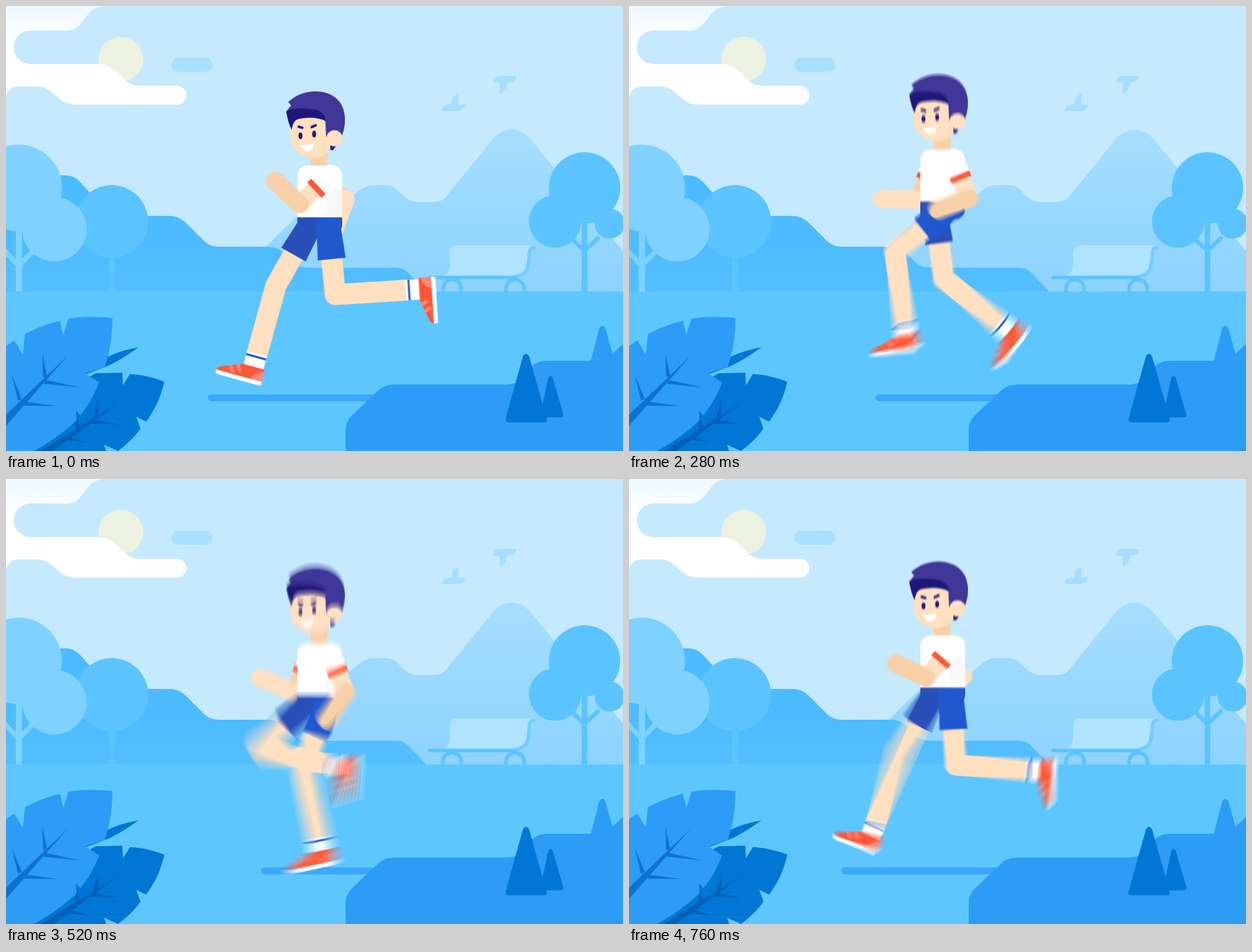
An HTML page with a canvas for the animation above (800 ms loop, 881x636 px).

```html
<!DOCTYPE html>
<html lang="en">
<head>
<meta charset="utf-8">
<title>Runner in the park</title>
<style>
html, body { margin: 0; width: 100%; height: 100%; overflow: hidden; background: #c5e9ff; }
canvas { display: block; }
</style>
</head>
<body>
<canvas id="stage" width="881" height="636"></canvas>
<script>
const W = 881, H = 636, LOOP = 800, STEP = 40, SHUTTER = 24, SAMPLES = 8;
const SKIN = '#ffdabe', TAN = '#f8cba8', NAVY = '#1c1678', RED = '#fa5233';
const LEAF = '#2c9cf6', DEEP = '#0077d4', MID = '#5ec6ff';

function layer() {
  const c = document.createElement('canvas');
  c.width = W;
  c.height = H;
  return c.getContext('2d');
}
const stage = document.getElementById('stage').getContext('2d');
const back = layer(), front = layer(), pose = layer(), blur = layer();

function fill(g, color, d) {
  g.fillStyle = color;
  g.fill(new Path2D(d));
}
function line(g, color, width, d) {
  g.strokeStyle = color;
  g.lineWidth = width;
  g.lineCap = g.lineJoin = 'round';
  g.stroke(new Path2D(d));
}
function disc(g, color, x, y, rx, ry = rx) {
  g.fillStyle = color;
  g.beginPath();
  g.ellipse(x, y, rx, ry, 0, 0, 7);
  g.fill();
}
function box(g, color, x, y, w, h, r = 0) {
  g.fillStyle = color;
  g.beginPath();
  g.roundRect(x, y, w, h, r);
  g.fill();
}
function fade(g, y0, c0, y1, c1) {
  const f = g.createLinearGradient(0, y0, 0, y1);
  f.addColorStop(0, c0);
  f.addColorStop(1, c1);
  return f;
}
// Tapered vein from a wide root to a pointed tip
function spike(g, color, x0, y0, x1, y1, w) {
  const k = w / 2 / Math.hypot(x1 - x0, y1 - y0), nx = (y0 - y1) * k, ny = (x1 - x0) * k;
  fill(g, color, `M${x0 + nx},${y0 + ny}L${x1},${y1}L${x0 - nx},${y0 - ny}Z`);
}

function drawBack(g) {
  box(g, '#c5e9ff', 0, 0, W, H);
  disc(g, '#edf1e2', 164, 76, 32);
  fill(g, fade(g, 0, '#ecf8ff', 50, '#ffffff'),
    'M0,0H142C118,2 118,14 105,27C99,33 94,35 86,35H35A24,24 0 0 0 35,83H132C150,83 158,95 168,104' +
    'C176,112 182,114 195,114H244A13.5,13.5 0 0 1 244,141H100C84,141 78,134 70,127C60,118 54,115 42,115H20C8,115 0,120 0,135Z');
  box(g, '#a9e0ff', 236, 74, 59, 20, 10);
  fill(g, '#a6deff', 'M622,150C622,143 628,141 636,140C636,132 640,127 646,126V141H656C655,147 650,150 643,150Z');
  fill(g, '#a6deff', 'M695,109C696,103 700,100 707,100H729C728,106 724,109 715,110C715,118 711,124 705,125V110Z');

  fill(g, fade(g, 176, '#a5deff', 408, '#8dd3ff'),
    'M305,408L416,300L480,280C496,276 505,256 525,256H543C562,256 565,280 588,280H612C622,280 627,275 632,268' +
    'L692,194C709,171 735,171 752,194L881,350V408Z');
  fill(g, fade(g, 330, '#4dbbff', 408, '#54bfff'),
    'M0,242H84C96,242 102,247 108,254L128,276C140,290 150,300 165,300H232C246,300 252,305 259,312L281,334' +
    'C288,341 294,344 305,344H370C384,344 389,346 396,353L406,363C413,371 420,374 432,374H554C566,374 571,377 577,384L600,408H0Z');

  const pale = '#7fd2ff', leafy = '#5bc4ff';
  disc(g, leafy, 151, 308, 52);
  box(g, leafy, 147, 355, 9, 53);
  disc(g, pale, 18, 260, 62);
  disc(g, pale, 69, 319, 46);
  box(g, pale, 14, 315, 9, 93);
  line(g, pale, 7, 'M-2,350L18,371L42,347');

  disc(g, leafy, 826, 260, 51);
  disc(g, leafy, 784, 308, 37.5);
  disc(g, leafy, 862, 311, 21.5);
  box(g, leafy, 822, 305, 8, 103);
  line(g, leafy, 6, 'M806,331L826,350L845,332');

  fill(g, '#afe3ff', 'M645,342H752C746,348 749,360 745,372C742,381 736,386 726,386H620C630,384 634,380 634,368V353C634,346 638,342 645,342Z');
  line(g, '#74ccff', 5, 'M727,387C746,384 746,372 747,358C747,348 749,345 754,345');
  line(g, leafy, 5, 'M605,388H727');
  for (const x of [637, 727]) line(g, leafy, 5, `M${x - 13},410V404A13,13 0 0 1 ${x + 13},404V410`);
  box(g, MID, 0, 408, W, 228);
}

function drawFront(g) {
  fill(g, LEAF,
    'M485,636V606C485,596 489,590 496,583L530,551C538,543 546,541 558,541H712C728,541 735,536 742,526' +
    'C752,511 760,507 775,507H835L847,461Q851.500,453 856,461L866,497L881,483V636Z');
  fill(g, DEEP, 'M713,591L738,501Q742.500,493 747,501L772,590Q773,595 768,595H717Q713,595 713,591Z');
  fill(g, DEEP, 'M762,588L774.500,531Q777.500,526 780.500,531L796,584Q796,588 792,588Z');

  fill(g, DEEP, 'M112,527C128,506 158,493 189,488C170,501 156,511 136,518Z');
  fill(g, DEEP,
    'M40,636L100,540L128,525L166,524L167,542L177,526C194,527 212,531 226,537C221,560 212,578 200,594' +
    'L186,587L192,604C183,617 172,627 160,636L140,627L143,636Z');
  const dark = '#0060b8';
  spike(g, dark, 50, 642, 166, 564, 11);
  spike(g, dark, 102, 602, 99, 574, 6);
  spike(g, dark, 128, 588, 133, 559, 6);
  spike(g, dark, 120, 594, 162, 598, 6);
  spike(g, dark, 84, 617, 120, 624, 6);

  fill(g, LEAF,
    'M0,486L12,478L24,498L27,469C44,460 60,454 77,450L82,470L89,447C110,443 132,444 152,446' +
    'C152,472 148,496 141,516L113,525L133,538C126,556 117,572 106,585L100,578L101,592C84,608 65,622 40,636H0Z');
  const vein = '#0f72d0';
  spike(g, vein, -8, 600, 88, 500, 12);
  spike(g, vein, 56, 530, 52, 497, 6);
  spike(g, vein, 20, 563, 8, 527, 6);
  spike(g, vein, 55, 537, 104, 545, 6);
  spike(g, vein, 24, 568, 75, 572, 6);
}

// Every key pose comes to rest at multiples of 200 ms
function settle(t) {
  const k = Math.floor(t / 200), f = t / 200 - k;
  return 200 * (k + f * f * (3 - 2 * f));
}

// Cyclic cubic through rows of [time, values...]
function track(rows, period, warp = t => t) {
  const n = rows.length;
  const time = i => warp(rows[(i + n) % n][0]) + period * Math.floor(i / n);
  const row = i => rows[(i + n) % n];
  return ms => {
    const t = warp(((ms % period) + period) % period);
    let i = n - 1;
    while (i > 0 && time(i) > t) i--;
    const span = time(i + 1) - time(i), u = (t - time(i)) / span;
    return row(i).slice(1).map((a, j) => {
      const at = k => row(k)[j + 1];
      const slope = k => (at(k + 1) - at(k - 1)) / (time(k + 1) - time(k - 1)) * span;
      const b = at(i + 1), m0 = slope(i), m1 = slope(i + 1), d = b - a;
      return a + u * (m0 + u * (3 * d - 2 * m0 - m1 + u * (m0 + m1 - 2 * d)));
    });
  };
}

const bodyY = track([[0, 228], [80, 240], [120, 236], [200, 201], [360, 224]], 400, settle);
const shadow = track([[0, 162], [120, 86], [200, 74], [360, 147]], 400, settle);
const headLift = track([[0, 106], [120, 106], [200, 106], [240, 109], [360, 104], [520, 110], [600, 112], [760, 106]], LOOP);
const ankle = track([[0, 573, 406], [120, 470, 410], [200, 421, 428], [360, 360, 495],
  [400, 367, 501], [520, 446, 515], [600, 511, 483], [760, 569, 416]], LOOP, settle);
// Upper arm and forearm angles in degrees
const armSwing = track([[0, 137, 224], [120, 113, 204], [200, 89, 180], [360, 46, 137],
  [400, 33, 110], [520, 68, 125], [600, 90, 157], [760, 130, 205]], LOOP);

function local(g, x, y, angle, draw) {
  g.save();
  g.translate(x, y);
  g.rotate(angle - Math.PI / 2);
  draw();
  g.restore();
}

function foot(g) {
  box(g, '#ffffff', -14.5, -2, 29, 22);
  box(g, '#2358c4', -14.5, 1, 29, 3);
  fill(g, RED, 'M-15,17H16L17,36H-50C-50,31 -46,29 -40,27Z');
  fill(g, '#fb8675', 'M17,36H1A16,15 0 0 1 16.300,21Z');
  line(g, '#fb8675', 5, 'M-21,21L-18,27M-31,25L-28,30');
  fill(g, '#ffffff', 'M-50,35H17V38Q17,41 14,41H-47Q-51,41 -50,35Z');
}

function leg(g, hx, hy, t, dx, dy, color) {
  const L = 103, [px, py] = ankle(t), ax = px + dx, ay = py + dy;
  const vx = ax - hx, vy = ay - hy, d = Math.hypot(vx, vy);
  const bend = Math.sqrt(Math.max(0, L * L - d * d / 4)) / d;
  const kx = hx + vx / 2 - vy * bend, ky = hy + vy / 2 + vx * bend;
  g.lineCap = 'butt';
  g.lineJoin = 'round';
  g.lineWidth = 30;
  g.strokeStyle = SKIN;
  g.beginPath();
  g.moveTo(hx, hy);
  g.lineTo(kx, ky);
  g.lineTo(ax, ay);
  g.stroke();
  local(g, ax, ay, Math.atan2(ay - ky, ax - kx), () => foot(g));
  local(g, hx, hy, Math.atan2(ky - hy, kx - hx), () =>
    fill(g, color, 'M-17,0A17,17 0 0 1 17,0L20,52H-20Z'));
}

function arm(g, sx, sy, t, fore, upperColor, foreColor) {
  const [a, b] = armSwing(t).map(v => v * Math.PI / 180);
  const ex = sx + 60 * Math.cos(a), ey = sy + 60 * Math.sin(a);
  line(g, upperColor, 25, `M${sx},${sy}L${ex},${ey}`);
  line(g, foreColor, 26, `M${ex},${ey}l${fore * Math.cos(b)},${fore * Math.sin(b)}`);
  local(g, sx, sy, a, () => {
    fill(g, '#ffffff', 'M-15,0A15,15 0 0 1 15,0V24H-15Z');
    box(g, RED, -15, 23, 30, 8);
  });
}

function head(g) {
  box(g, SKIN, 406, 145, 64, 72, 31);
  fill(g, '#2a248a', 'M463,196L475,195L467,206H463Z');
  fill(g, '#3a3693',
    'M400,151L407,142L403,137C414,127 428,122 442,122C468,122 484,138 484,162C484,172 482,180 479,187L457,187L456,163L430,150Z');
  disc(g, SKIN, 469, 189, 11.5);
  fill(g, NAVY,
    'M400,151C408,145 420,146 434,147C448,148 456,153 457,165C446,158 426,159 416,162C410,165 409,171 408,177C404,170 402,161 400,151Z');
  disc(g, NAVY, 420.5, 185.5, 2.8, 4.8);
  disc(g, NAVY, 440, 183, 2.8, 4.8);
  line(g, NAVY, 3.6, 'M418,172.500L423,174M436.500,173L442,170.500');
  fill(g, '#ffffff', 'M420,199C426,199 434,198 439,196C440,210 423,211 420,199Z');
}

function drawRunner(g, t) {
  const [top] = bodyY(t), waist = top + 74, lift = top - headLift(t)[0] - 122;
  const shade = '#2450b8';
  arm(g, 435, top + 15, t + 400, 53, TAN, SKIN);
  leg(g, 436, waist + 8, t + 400, -9, -2, shade);
  box(g, shade, 416, waist - 6, 64, 32, [0, 0, 16, 8]);
  leg(g, 460, waist + 8, t, 0, 0, '#1f58ce');
  box(g, TAN, 435, lift + 200, 24, top + 4 - lift - 200);
  box(g, '#ffffff', 416, top, 64, 74, [14, 14, 0, 0]);
  box(g, '#f2f2f4', 458, top + 32, 22, 42, [10, 0, 0, 0]);
  arm(g, 463, top + 14, t, 48, SKIN, TAN);
  g.save();
  g.translate(0, lift);
  head(g);
  g.restore();
}

function render(t) {
  stage.drawImage(back.canvas, 0, 0);
  const [half] = shadow(t);
  box(stage, '#3ba9fb', 450 - half, 555, 2 * half, 10, 5);
  stage.drawImage(front.canvas, 0, 0);

  // Motion blur: equal-weight sum of poses across the shutter
  blur.clearRect(0, 0, W, H);
  blur.globalCompositeOperation = 'lighter';
  blur.globalAlpha = 1 / SAMPLES;
  for (let i = 0; i < SAMPLES; i++) {
    pose.clearRect(0, 0, W, H);
    drawRunner(pose, t + SHUTTER * ((i + 0.5) / SAMPLES - 0.5));
    blur.drawImage(pose.canvas, 0, 0);
  }
  stage.drawImage(blur.canvas, 0, 0);
}

drawBack(back);
drawFront(front);
const start = performance.now();
let shown = -1;
function tick() {
  const t = Math.floor(((performance.now() - start) % LOOP) / STEP) * STEP;
  if (t !== shown) render(shown = t);
  requestAnimationFrame(tick);
}
tick();
</script>
</body>
</html>
```
